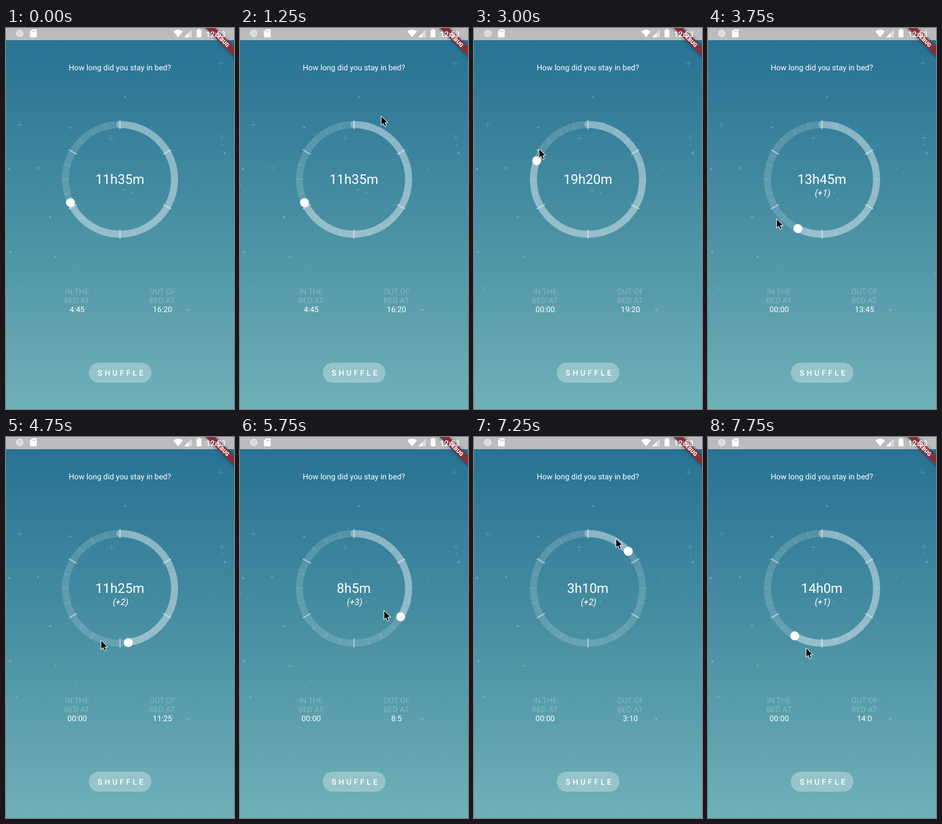
Recreate the animation shown at these times as an HTML page. Size 357x594 px, loop 8000 ms.

```html
<!DOCTYPE html>
<html lang="en">
<head>
<meta charset="utf-8">
<title>Sleep dial</title>
<style>
  html, body { margin: 0; width: 100%; height: 100%; overflow: hidden; background: #488fa3; }
  svg { display: block; width: 357px; height: 594px; }
  text { font: 12.16px Roboto, sans-serif; fill: #fff; text-rendering: geometricPrecision; }
  .mid { text-anchor: middle; }
  .label { fill-opacity: .26; }
  .big { font-size: 20.84px; }
  .days { font-size: 13.9px; font-style: italic; }
  .medium { font-weight: 500; }
  .banner { font-size: 8.6px; font-weight: 900; }
  .shadow { filter: drop-shadow(0 0 2.5px rgba(0, 0, 0, .5)); }
</style>
</head>
<body>
<svg viewBox="0 0 357 594">
  <defs>
    <linearGradient id="sky" x2="0" y2="1">
      <stop offset="0" stop-color="#257092"/>
      <stop offset=".5" stop-color="#488fa3"/>
      <stop offset="1" stop-color="#70b1b8"/>
    </linearGradient>
  </defs>
  <rect width="357" height="594" fill="url(#sky)"/>
  <g id="stars" fill="#fff" fill-opacity=".2" stroke="#fff"/>

  <text class="mid" x="178.3" y="66">How long did you stay in bed?</text>

  <g transform="translate(178.5 236)" fill="none" stroke="#fff">
    <circle r="85.5" stroke-width="11" stroke-opacity=".15"/>
    <circle id="fill" r="85.5" stroke-width="11" stroke-opacity=".31" stroke-linecap="round"
      pathLength="1440" transform="rotate(-90)"/>
    <g id="ticks"/>
    <circle id="handle" r="7" fill="#fff" stroke="none"/>
  </g>
  <text class="mid big" id="duration" x="178.2" y="243.2"/>
  <text class="mid days" id="days" x="179.5" y="261.6"/>

  <text class="mid label" x="111" y="415">IN THE</text>
  <text class="mid label" x="111" y="429">BED AT</text>
  <text class="mid" id="start" x="111.5" y="442.8"/>
  <text class="mid label" x="245" y="415">OUT OF</text>
  <text class="mid label" x="244.5" y="429">BED AT</text>
  <text class="mid" id="end" x="245" y="442.8"/>

  <rect x="129.7" y="521.8" width="98" height="31.2" rx="15.6" fill="#fff" fill-opacity=".3"/>
  <text class="medium" x="143.6" y="541.8" letter-spacing="3.47">SHUFFLE</text>

  <rect width="357" height="19" fill="#bcbcbc"/>
  <g transform="translate(357 0) rotate(45)">
    <rect class="shadow" x="-45" y="20.9" width="90" height="10.4" fill="#87303a"/>
    <text class="mid banner" x="0" y="29.2">DEBUG</text>
  </g>
  <g fill="#fff">
    <circle cx="21.5" cy="8.5" r="5.3" fill-opacity=".45" stroke="#fff" stroke-opacity=".7"/>
    <path d="M41 2h6a1 1 0 0 1 1 1v10.5a1 1 0 0 1-1 1h-8.5a1 1 0 0 1-1-1V5.5z"/>
    <path d="M41.5 4v2.5M43.5 4v2.5M45.5 4v2.5" stroke="#bcbcbc"/>
    <path d="M262 5.500Q269.500-.5 277 5.500L269.500 14.500z"/>
    <path d="M291 2.500V14.500H279z" fill-opacity=".45"/>
    <path d="M286 7.500V14.500H279z"/>
    <path d="M298.500 3H300.500V1.500H304V3H306V14.500H298.500z"/>
  </g>
  <text class="medium" x="313" y="13.5">12:53</text>
  <path id="cursor" d="M0 0V14.600L3.300 11.500 5.700 16.800 8.300 15.700 6 10.600H10.500z"
    fill="#000" stroke="#fff"/>
</svg>
<script>
const $ = id => document.getElementById(id);
const RADIUS = 85.5, DAY = 1440, LOOP = 8000, STEP = 250;
const BED_TIME = 285, ENTER = 1000, GRAB = 1500;

function add(parent, tag, attrs) {
  const el = document.createElementNS("http://www.w3.org/2000/svg", tag);
  for (const name in attrs) el.setAttribute(name, attrs[name]);
  parent.append(el);
}

let seed = 11;
const random = () => (seed = seed * 16807 % 2147483647) / 2147483647;

for (let i = 0; i < 17; i++) add($("stars"), "circle", {
  cx: 357 * random(), cy: 70 + 390 * random(), r: 1 + 1.2 * random(), stroke: "none"
});
for (const [x, y] of [[336, 55], [21, 151], [165, 172], [338, 171]]) add($("stars"), "path", {
  d: `M${x - 5} ${y}h10M${x} ${y - 5}v10`, "stroke-opacity": .17
});

for (let i = 0; i < 24; i++) {
  const main = i % 4 === 0;
  add($("ticks"), "path", {
    d: main ? "M0-92.5V-78" : "M0-91V-80",
    transform: `rotate(${i * 15})`,
    "stroke-width": main ? 1.8 : 1,
    "stroke-opacity": main ? .5 : .18
  });
}

// The dial is turned forward through several days, then back.
const keys = [
  {t: 0, total: 980, lead: 0, radius: RADIUS},
  {t: GRAB, total: 980, lead: 0, radius: RADIUS},
  {t: 2000, total: 795, lead: -3, radius: RADIUS},
  {t: 3750, total: 2265, lead: 23, radius: 94, power: 2.5},
  {t: 4750, total: 3565, lead: 29, radius: 86},
  {t: 5750, total: 4805, lead: 5, radius: 58},
  {t: 6500, total: 4255, lead: -23, radius: 79, power: 2},
  {t: 7750, total: 2280, lead: -15, radius: 96}
];

const lerp = (a, b, k) => a + (b - a) * k;

function poseAt(t) {
  const i = keys.findIndex(key => key.t >= t && key.t > 0);
  const from = keys[i - 1], to = keys[i];
  const k = (t - from.t) / (to.t - from.t);
  return {
    total: Math.round(lerp(from.total, to.total, k ** (to.power || 1)) / 5) * 5,
    lead: lerp(from.lead, to.lead, k),
    radius: lerp(from.radius, to.radius, k)
  };
}

function polar(degrees, radius) {
  const a = degrees * Math.PI / 180;
  return [radius * Math.sin(a), -radius * Math.cos(a)];
}

const place = (el, x, y) => el.setAttribute("transform", `translate(${x} ${y})`);
const split = minutes => [Math.floor(minutes / 60), minutes % 60];

function draw(now) {
  const t = Math.floor(now % LOOP / STEP) * STEP;
  const {total, lead, radius} = poseAt(t);
  const minutes = total % DAY, days = Math.floor(total / DAY);
  const angle = minutes / DAY * 360;
  const dragged = t > GRAB;

  $("fill").setAttribute("stroke-dasharray", `${minutes} ${DAY * 2}`);
  place($("handle"), ...polar(angle, RADIUS));

  const [h, m] = split(dragged ? minutes : minutes - BED_TIME);
  $("duration").textContent = `${h}h${m}m`;
  $("days").textContent = days ? `(+${days})` : "";
  $("start").textContent = dragged ? "00:00" : split(BED_TIME).join(":");
  $("end").textContent = split(minutes).join(":");

  const [dx, dy] = polar(angle + lead, radius);
  const arrival = Math.min(1, (t - ENTER) / (GRAB - ENTER));
  place($("cursor"), lerp(341, 178.5 + dx, arrival), lerp(2, 236 + dy, arrival));
  $("cursor").style.display = t < ENTER ? "none" : "";
}

const began = performance.now();
function tick() {
  draw(performance.now() - began);
  requestAnimationFrame(tick);
}
tick();
</script>
</body>
</html>
```
